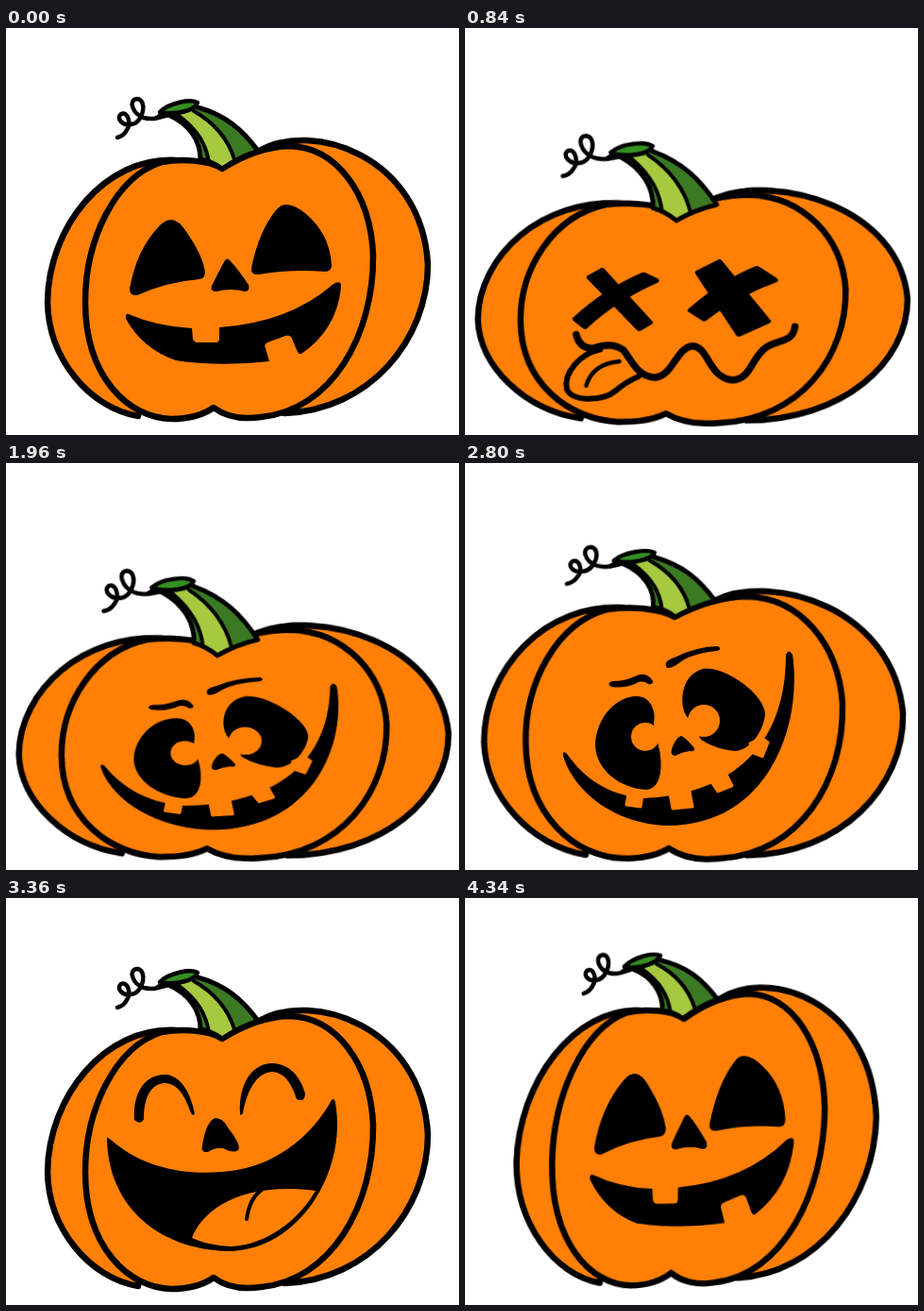
Write an HTML page that moves like this. It is 480 px wide and 431 px high and loops after 4.48 s.

```html
<!DOCTYPE html>
<html lang="en">
<head>
<meta charset="utf-8">
<title>Jumping pumpkin</title>
<style>
  html, body { margin: 0; width: 100%; height: 100%; overflow: hidden; background: #fff; }
  svg { display: block; width: 100%; height: 100%; }

  .line { fill: none; stroke: #000; stroke-linecap: round; stroke-linejoin: round; }
  .line, .body path { vector-effect: non-scaling-stroke; }
  .body path { fill: #ff8004; stroke: #000; stroke-width: 6.5; stroke-linejoin: round; }
  .skin { fill: #ff8004; }
  .cross { stroke: #000; stroke-width: 6; stroke-linejoin: round; }
  .teeth { stroke: #ff8004; stroke-width: 3; stroke-linejoin: round; }

  /* One hop: rest, crouch, stretch, land, rebound */
  .body, .stem, .face { animation: 1120ms step-end infinite; }
  .body { animation-name: body; }
  .stem { animation-name: stem; }
  .face { animation-name: face; }
  @keyframes body {
    0%    { transform: none; }
    50%   { transform: matrix(1.103, .0216, .015, .969, -32.7, 13.7); }
    62.5% { transform: matrix(.88, -.02, -.03, 1.16, 39.5, -75.5); }
    75%   { transform: matrix(1.13, .03, .005, .845, -37.5, 62); }
    87.5%, 100% { transform: matrix(.944, -.0134, -.02, 1.063, 18.8, -27.4); }
  }
  @keyframes stem {
    0%    { transform: none; }
    50%   { transform: matrix(1.06, .03, -.077, .961, -8.2, 12.9); }
    62.5% { transform: matrix(.88, -.02, -.03, 1.16, 39.5, -75.5); }
    75%   { transform: matrix(1.1, .1, -.05, 1.09, -20.5, 18.6); }
    87.5%, 100% { transform: matrix(.953, -.05, -.011, .97, 14.5, -5.5); }
  }
  @keyframes face {
    0%    { transform: none; }
    50%   { transform: matrix(1.103, .0216, .015, .969, -32.7, 13.7); }
    62.5% { transform: matrix(.88, -.02, -.03, 1.16, 39.5, -75.5); }
    75%   { transform: matrix(1.13, .045, .005, .83, -36.5, 65.5); }
    87.5%, 100% { transform: matrix(.944, -.0134, -.02, 1.063, 18.8, -27.4); }
  }

  /* Each face lasts from one landing to the next */
  .mood { visibility: hidden; animation: mood 4480ms step-end infinite; }
  .grin  { animation-delay: -280ms; }
  .dizzy { animation-delay: -3640ms; }
  .silly { animation-delay: -2520ms; }
  .laugh { animation-delay: -1400ms; }
  @keyframes mood {
    0% { visibility: visible; }
    25%, 100% { visibility: hidden; }
  }
</style>
</head>
<body>
<svg viewBox="0 0 480 431" preserveAspectRatio="none">
  <g class="body">
    <path d="M180 140C105 136 45 210 44 290C45 350 88 402 140 411Z"/>
    <path d="M268 130C325 98 440 135 447 250C447 330 385 405 295 408Z"/>
    <path d="M229 149C215 140 185 138 165 142C115 158 84 225 84 290C84 370 130 413 175 414
      C195 414 210 409 220 402C232 411 250 415 270 412C345 405 390 325 389 240
      C386 175 350 126 300 125C270 126 245 139 229 149Z"/>
  </g>

  <g class="stem">
    <path fill="#3b7a22" d="M172 92C195 102 206 120 206 139Q218 141 229 149Q246 137 267 130C250 107 232 92 203 84Z"/>
    <path fill="#a6c93f" d="M184 92C204 108 212 124 215 142L229 149L242 140C236 120 222 101 199 88Z"/>
    <path class="line" stroke-width="4" d="M182 92C204 108 212 124 215 142M199 88C222 101 236 120 242 139"/>
    <path class="line" stroke-width="5" d="M172 92C195 102 206 120 206 139Q218 141 229 149Q246 137 267 130C250 107 232 92 203 84"/>
    <path class="line" style="fill:#349022" stroke-width="4.5" d="M163 89C173 79 195 75 203 79C200 87 180 93 163 89Z"/>
    <path d="M148 98Q160 94 166 87L184 95Q165 93 148 98Z"/>
    <path class="line" stroke-width="4.5" d="M180 91C168 91 160 99 146 95C134 91 129 76 139 75C150 76 146 100 133 102
      C124 104 116 96 122 91C129 88 133 101 128 108C126 112 122 115 118 116"/>
  </g>

  <g class="face">
    <g class="mood grin">
      <path d="M175 203Q183 203 192 217Q208 240 211 258Q211 265 205 266Q170 269 139 283Q131 284 131 276Q138 235 163 209Q169 203 175 203Z"/>
      <path d="M296 187Q305 186 318 197Q343 218 345 251Q345 258 338 258Q302 255 268 261Q259 262 260 254Q268 215 286 193Q291 187 296 187Z"/>
      <path d="M232 246Q234 243 237 246Q245 254 257 272Q259 279 253 279Q238 275 223 279Q216 279 218 273Q228 253 232 246Z"/>
      <path d="M130 303Q160 316 197 318L198 329Q199 333 203 333L222 333Q226 333 226 329L226 317Q300 312 347 271
        Q356 266 355 275Q350 320 313 345Q310 346 308 341L303 329Q301 324 296 326L277 333Q273 335 275 339L279 353
        Q225 359 180 352Q145 340 127 308Q126 302 130 303Z"/>
    </g>

    <g class="mood dizzy">
      <g transform="matrix(.907 -.0202 -.014 1.032 29.85 -14.8)">
        <path class="cross" d="M134 241L147 232L197 295L186 303ZM190 236L203 243Q160 267 130 302L120 293Q150 258 190 236Z"/>
        <path class="cross" d="M246 232L268 218L319 290L289 307ZM307 225L326 239Q285 258 253 289L239 279Q272 243 307 225Z"/>
        <path class="line" style="fill:#ff8004" stroke-width="6" d="M146 330C125 336 108 360 112 380C118 396 150 394 163 380Q172 370 186 362"/>
        <path class="line" stroke-width="4.5" d="M166 344Q138 348 132 375"/>
        <path class="line" stroke-width="7.5" d="M121 312Q124 328 138 329C150 324 160 322 170 330C180 345 185 362 203 363
          C222 360 225 325 241 323C258 322 258 362 283 364C303 362 302 335 318 322C332 312 345 315 347 296"/>
      </g>
    </g>

    <g class="mood silly">
      <g transform="matrix(.907 -.0202 -.014 1.032 29.85 -14.8)">
        <path d="M155 237Q149 233 157 231Q170 231 180 226Q192 220 199 231Q199 235 194 234Q187 229 180 234Q168 239 155 237Z"/>
        <path d="M214 217Q209 210 222 206Q243 195 268 194Q273 197 267 199Q240 202 228 211Q219 218 214 217Z"/>
        <path d="M182 247C196 247 203 262 200 276L204 296C210 315 210 345 192 346C165 345 138 325 138 298C139 270 160 247 182 247Z"/>
        <path d="M252 218C275 214 317 245 318 265C317 285 300 306 285 305C268 303 258 298 250 293L238 272C226 262 226 225 252 218Z"/>
        <circle class="skin" cx="191" cy="290" r="15"/>
        <circle class="skin" cx="253" cy="273" r="17"/>
        <path d="M229 289Q233 290 243 302Q244 306 238 305Q230 306 223 310Q217 310 219 303Q223 291 229 289Z"/>
        <path d="M108 308C130 340 160 353 190 355C270 352 340 310 340 203Q343 196 347 203C358 280 320 384 215 384
          C150 382 112 340 104 310Q103 304 108 308Z"/>
        <path class="skin teeth" d="M173 350L188 352L186 364L171 362ZM217 350L238 348L241 364L220 366Z
          M261 338L277 330L283 342L268 348ZM302 297L314 291L321 296L315 311L305 307Z"/>
      </g>
    </g>

    <g class="mood laugh">
      <path d="M136 235C134 200 152 186 170 187C188 189 197 212 200 229Q198 231 196 228C190 210 182 196 168 196C154 197 146 210 146 234Q143 241 136 235Z"/>
      <path d="M248 229C246 195 262 175 282 175C302 176 312 190 317 207Q317 217 308 213C302 195 295 185 282 184C265 185 255 205 251 228Q249 231 248 229Z"/>
      <path d="M222 233Q230 233 235 243Q250 262 246 267Q241 271 230 265Q222 264 214 269Q206 270 208 262Q212 236 222 233Z"/>
      <path d="M107 255Q106 252 111 256C150 290 200 295 245 288C290 280 325 250 345 214Q348 211 349 217C362 290 310 374 235 374C160 372 108 325 107 255Z"/>
      <path class="skin" d="M197 360C208 330 250 300 328 310C305 350 265 369 237 369Q215 368 197 360Z"/>
      <path class="line" stroke-width="4" d="M271 309Q258 318 255 340"/>
    </g>
  </g>
</svg>
</body>
</html>
```
